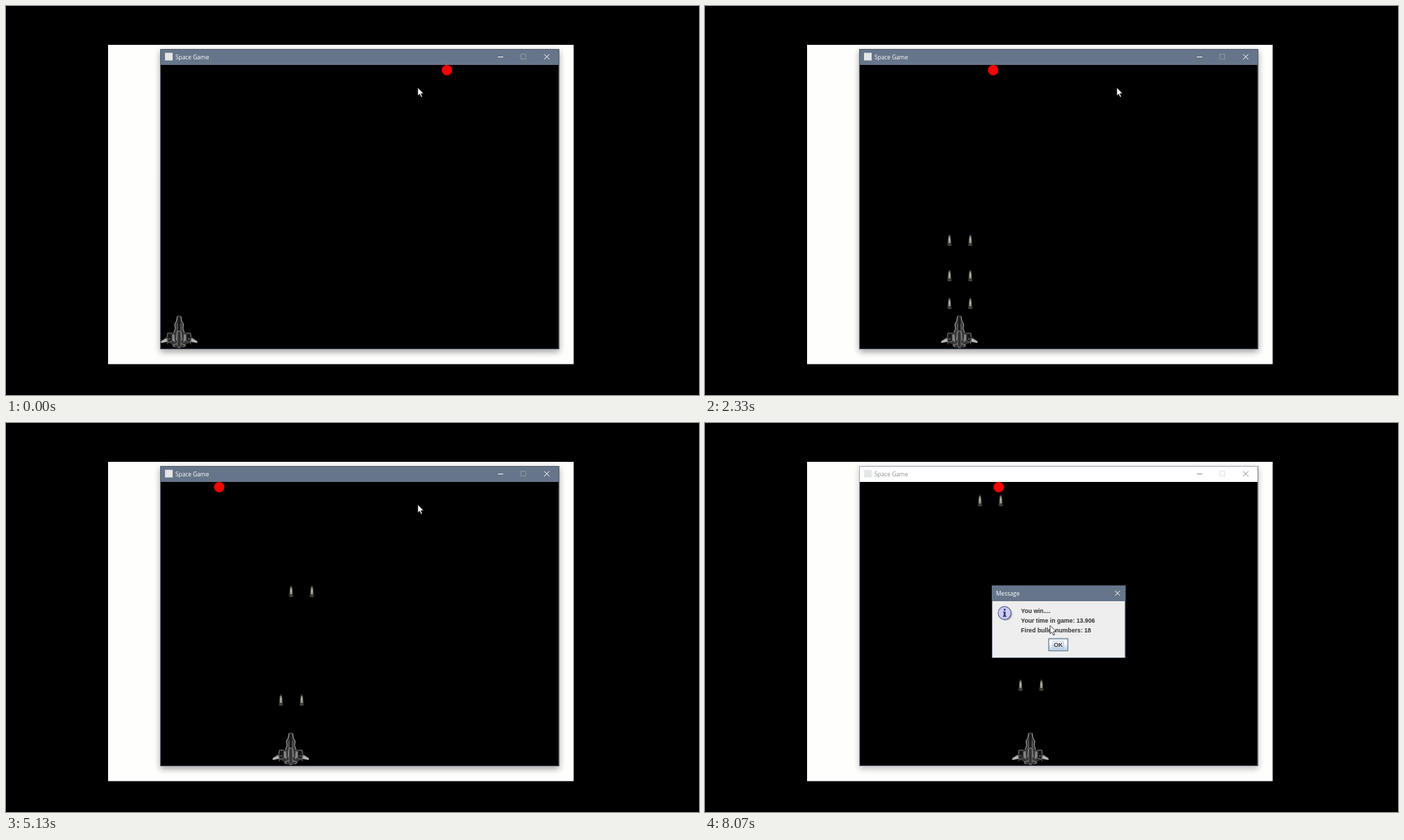
Recreate the animation shown at these times as an HTML page. Size 998 px wide and 561 px high, loop 8110 ms.

```html
<!DOCTYPE html>
<html lang="en">
<head>
<meta charset="utf-8">
<title>Space Game</title>
<style>
  html, body { margin: 0; width: 100%; height: 100%; overflow: hidden; background: #000; }
  svg { display: block; width: 998px; height: 561px; }
  .ui { font: 8.35px "Open Sans", "Noto Sans", sans-serif; }
  .msg { font: bold 8.7px "Liberation Sans", Arial, sans-serif; fill: #333; }
  .line { fill: none; stroke: currentColor; }
</style>
</head>
<body>
<svg viewBox="0 0 998 561">
  <defs>
    <clipPath id="panelClip"><rect x="147" y="56" width="670.5" height="460.5"/></clipPath>
    <clipPath id="gameClip"><rect x="223" y="85" width="573" height="409.5"/></clipPath>
    <filter id="blur" x="-10%" y="-10%" width="120%" height="120%"><feGaussianBlur stdDeviation="5"/></filter>
    <linearGradient id="buttonFill" x2="0" y2="1">
      <stop offset="0" stop-color="#dde8f3"/><stop offset=".3" stop-color="#fff"/><stop offset="1" stop-color="#b8cfe5"/>
    </linearGradient>
    <linearGradient id="core" x2="0" y2="1">
      <stop offset="0" stop-color="#6c6b60"/><stop offset=".5" stop-color="#b9b8ab"/><stop offset="1" stop-color="#8c8a7c"/>
    </linearGradient>
    <g id="half">
      <path fill="#363636" d="M0 0 3 1 4 8 7 13 6 19 8 25 17 25 18 31 26 37V40L17 39 10 42 9 46 0 47Z"/>
      <path fill="#b4b4b2" d="M18 33 26 37.5V40L17 38Z"/>
      <path fill="#858585" d="M7 27 10 28V36L6 39Z"/>
      <path fill="#161616" d="M11 26H16V38H11ZM0 3H1.6V22H0Z"/>
      <path fill="none" stroke="#a9a9a9" stroke-width="1" d="M2.6 1.5 3.6 8 6.3 13 5.4 19 7.5 25"/>
      <path fill="none" stroke="#777" stroke-width=".9" d="M10.5 26H16.5L17 31M2.6 12V44M16.5 33V42M10 37 16 39"/>
      <path fill="none" stroke="#9a9a9a" stroke-width=".9" d="M0 22 3 25 4 36M3 41 9 43 6 46M1 45V47.5"/>
      <path fill="#5d4b43" d="M12.5 33H15V35.5H12.5Z"/>
    </g>
    <g id="bullet">
      <path fill="#2b2a24" d="M0-9 2-6 2.8 4 3.6 6 2.5 8.5H-2.5L-3.6 6-2.8 4-2-6Z"/>
      <path fill="url(#core)" d="M0-7 1.2-5 1.7 4.5H-1.7L-1.2-5Z"/>
      <path fill="#55534a" d="M-2 6H2V7.4H-2Z"/>
    </g>
  </defs>

  <rect width="998" height="561"/>
  <g clip-path="url(#panelClip)">
    <rect x="147" y="56" width="671" height="461" fill="#fefefd"/>
    <rect id="shadow" x="222" y="65" width="575" height="434" fill="#000" filter="url(#blur)"/>
  </g>
  <rect x="222" y="62" width="574.5" height="433"/>
  <rect id="bar" x="222.5" y="62.5" width="573.5" height="22.5"/>
  <rect x="229" y="67.5" width="11" height="11" fill="#e3e5e6"/>
  <text id="caption" class="ui" x="244" y="76.6">Space Game</text>
  <g id="buttons">
    <path class="line" d="M708.5 73.5H716"/>
    <path class="line" opacity=".25" d="M741.5 69.5H748.5V76.5H741.5Z"/>
    <path class="line" d="M775 69.5 782.5 77M782.5 69.5 775 77"/>
  </g>
  <rect id="frame" x="222.5" y="62.5" width="573.5" height="432" fill="none" stroke-width=".8"/>

  <g clip-path="url(#gameClip)">
    <g id="shots"></g>
    <circle id="ball" cy="92.5" r="7.5" fill="#f00"/>
    <g id="ship"><use href="#half"/><use href="#half" transform="scale(-1 1)"/></g>
  </g>

  <g id="dialog">
    <rect x="413.5" y="235" width="191.5" height="103.5" fill="#eee" stroke="#6c7a8b"/>
    <rect x="413" y="234.5" width="192.5" height="22.5" fill="#66758a"/>
    <text class="ui" x="419" y="249" fill="#fff">Message</text>
    <path d="M590.5 242 597.5 249M597.5 242 590.5 249" stroke="#fff"/>
    <circle cx="432.8" cy="275.3" r="9.8" fill="#aaa"/>
    <circle cx="431.4" cy="274" r="9.3" fill="#ccccfa" stroke="#66669a" stroke-width="1.2"/>
    <path fill="#333366" d="M430.2 268H432.8V270.4H430.2ZM429.4 272H432.8V278H434V279.4H429V278H430.2V273.3H429.4Z"/>
    <g class="msg">
      <text x="455" y="274">You win....</text>
      <text x="455" y="287.8">Your time in game: 13.906</text>
      <text x="455" y="301.5">Fired bullet numbers: 18</text>
      <rect x="495" y="311" width="27.5" height="17.5" fill="url(#buttonFill)" stroke="#75879a" stroke-width="1.4"/>
      <rect x="501" y="315" width="15.5" height="10" fill="none" stroke="#a3b8cc" stroke-width=".7"/>
      <text x="508.7" y="323.2" text-anchor="middle">OK</text>
    </g>
  </g>
  <path id="cursor" fill="#fff" stroke="#000" stroke-width=".7" d="M0 0V12L2.7 9.5 4.7 14 6.6 13.2 4.7 8.8H8.5Z"/>
</svg>
<script>
  const LOOP = 8110, FPS = 30;
  const HIT = 6363, DIALOG = 6530, FADE = 200;
  const STEP = 14.62, BULLET_SPEED = 0.234, BALL_SPEED = 0.0943, WALL = 229;

  // ship runs: start, end, steps (negative = left)
  const runs = [[1120, 1800, 8], [2400, 3200, 6], [3620, 4180, -2], [4400, 4850, -1],
                [5200, 5500, 2], [5640, 6000, 2]];
  const shotTimes = [1854, 2072, 2243, 3320, 3470, 4248, 4917, 5551, 6055];

  const $ = id => document.getElementById(id);
  const set = (el, attrs) => { for (const k in attrs) el.setAttribute(k, attrs[k]); };
  const move = (el, x, y) => el.setAttribute('transform', `translate(${x} ${y})`);
  const clamp = v => Math.max(0, Math.min(1, v));

  function shipX(t) {
    let steps = 0;
    for (const [from, to, n] of runs) {
      const count = Math.abs(n);
      const done = t < from ? 0 : Math.min(count, 1 + Math.floor((t - from) / (to - from) * (count - 1 || 1)));
      steps += Math.sign(n) * (count === 1 ? +(t >= (from + to) / 2) : done);
    }
    return 249.3 + steps * STEP;
  }

  const shots = shotTimes.map(time => {
    const el = document.createElementNS('http://www.w3.org/2000/svg', 'g');
    el.innerHTML = '<use href="#bullet" x="-15"/><use href="#bullet" x="15"/>';
    $('shots').append(el);
    return { el, time, x: shipX(time) + 0.8 };
  });

  function paintWindow(active) {
    set($('bar'), { fill: active ? '#66758a' : '#fff' });
    set($('caption'), { fill: active ? '#fff' : '#8e8e8e' });
    set($('buttons'), { color: active ? '#fff' : '#8c8c8c' });
    set($('frame'), { stroke: active ? '#596474' : '#a9abc0' });
    set($('shadow'), { opacity: active ? 0.36 : 0.24 });
  }

  function draw(t) {
    const game = Math.min(t, HIT);
    set($('ball'), { cx: WALL + Math.abs(635 - WALL - BALL_SPEED * game) });
    move($('ship'), shipX(game), 446);
    for (const { el, time, x } of shots) {
      el.style.display = game < time ? 'none' : '';
      move(el, x, 450 - BULLET_SPEED * (game - time));
    }

    paintWindow(t < DIALOG);
    const shown = 1 - (1 - clamp((t - DIALOG) / FADE)) ** 2;
    const size = 0.96 + 0.04 * shown;
    set($('dialog'), {
      opacity: shown,
      transform: `translate(509 286.5) scale(${size}) translate(-509 -286.5)`
    });

    const p = clamp((t - 7700) / 360), ease = p * p * (3 - 2 * p);
    move($('cursor'), 593 - 96 * ease, 117.5 + 174.5 * ease);
  }

  const start = performance.now();
  function tick() {
    const t = (performance.now() - start) % LOOP;
    draw(Math.floor((t + 4) * FPS / 1000) * 1000 / FPS);
    requestAnimationFrame(tick);
  }
  tick();
</script>
</body>
</html>
```
